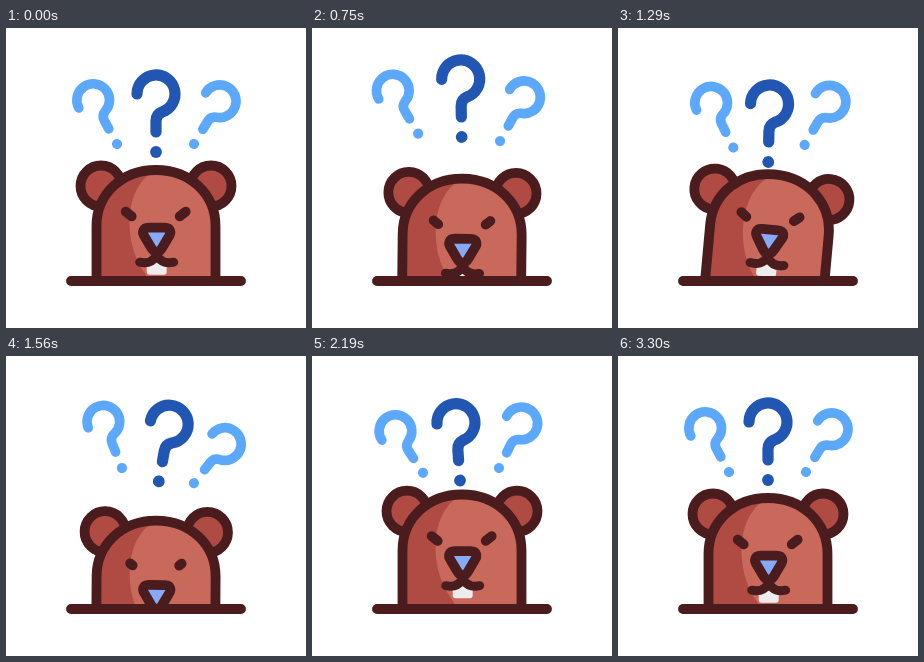
An HTML page for the animation above (4.53 s loop, 300 px wide and 300 px high).

```html
<!DOCTYPE html>
<html lang="en">
<head>
<meta charset="utf-8">
<title>Puzzled beaver</title>
<style>
  html, body { margin: 0; width: 100%; height: 100%; overflow: hidden; background: #fff; }
  svg { display: block; width: 100vw; height: 100vh; }
  .line { fill: none; stroke: #4b1c1e; stroke-width: 9.8; stroke-linecap: round; stroke-linejoin: round; }
  .light { fill: #c8695c; }
  .dark { fill: #b04b43; }
  .mark { color: #5ba8fd; }
  #mid { color: #2157b3; }
  #shape path { fill: none; stroke: currentColor; stroke-width: 11.2; stroke-linecap: round; }
  #shape circle { fill: currentColor; }
</style>
</head>
<body>
<svg viewBox="0 0 300 300">
  <defs>
    <clipPath id="above"><rect width="300" height="249"/></clipPath>
    <g id="shape">
      <path d="M-19-58A19 19 0 1 1 6-40Q0-37.500 0-31V-20"/>
      <circle r="5.900"/>
    </g>
  </defs>

  <g id="left" class="mark"><use href="#shape" transform="scale(.86)"/></g>
  <g id="mid" class="mark"><use href="#shape"/></g>
  <g id="right" class="mark"><use href="#shape" transform="scale(.86)"/></g>

  <g clip-path="url(#above)">
    <g id="ears">
      <circle id="earL" class="line" style="fill:#b04b43" r="20.500"/>
      <circle id="earR" class="line" style="fill:#b04b43" r="20.500"/>
    </g>
    <g id="head">
      <path class="light" d="M-59.500 40V-50C-59.500-82-34-106 0-106S59.500-82 59.500-50V40Z"/>
      <path class="dark" d="M-59.500 40V-50C-59.500-82-34-106 0-106C-18-97-26.500-76-26.500-53C-26.500-32-20-14-8 2V40Z"/>
      <path class="line" d="M-59.500 40V-50C-59.500-82-34-106 0-106S59.500-82 59.500-50V40"/>
    </g>
    <g id="eyes">
      <path id="eyeL" class="line"/>
      <path id="eyeR" class="line"/>
    </g>
    <g id="muzzle">
      <path fill="#ededed" d="M-10 20H10V34Q10 37 7 37H-7Q-10 37-10 34Z"/>
      <path class="line" style="stroke-width:9" d="M-17 24.500Q-6 27 0 18Q6 27 17 24.500"/>
      <path class="line" style="fill:#86a9f8" d="M-8-10H8C14-10 15-5 12-1L5.500 10Q0 19-5.500 10L-12-1C-15-5-14-10-8-10Z"/>
    </g>
  </g>
  <path class="line" d="M65 253H235"/>
</svg>

<script>
const LOOP = 4530, BEAT = 545;
const $ = id => document.getElementById(id);

// Each list holds the turning points of one swing, which starts and ends at rest.
const drop = [15, -5, 24, -3.5, 4];
const lean = [-2.7, 7.5, 0, 0, 0];

// rest: x, y, turn of the dot; first: time of the first turning point of the hop
const marks = {
  left: {
    rest: [111, 116, -28.5], first: 620,
    drift: [-9, 4, 5, 0, 2], hop: [-13, 5, -6, 1, 0], sway: [-3, 0, 7, -5, 0]
  },
  mid: {
    rest: [150, 124, 0], first: 750,
    drift: [0, -1, 3, -2, 1], hop: [-15, 10, -8, 4, 0], sway: [0, -3, 11, -4, 3]
  },
  right: {
    rest: [188, 116, 31], first: BEAT,
    drift: [1, -2, 0, -1, -2], hop: [-2.5, -4, 12, -4, 5], sway: [-1, -5, 8, -4.5, 0.5]
  }
};

// eased swing from one turning point to the next, one per beat
function swing(points, t, first = BEAT) {
  const s = t < first ? t / first : 1 + (t - first) / BEAT;
  const i = Math.floor(s), u = s - i;
  const from = points[i - 1] || 0, to = points[i] || 0;
  return from + (to - from) * u * u * (3 - 2 * u);
}

function place(id, x, y, turn = 0) {
  $(id).setAttribute('transform', `translate(${x} ${y}) rotate(${turn})`);
}

function eye(id, x, side, size) {
  const dx = 3 * size * side, dy = 2.4 * size;
  $(id).setAttribute('d', `M${x - dx} ${dy}L${x + dx} ${-dy}`);
}

function draw(t) {
  for (const id in marks) {
    const { rest: [x, y, turn], first, drift, hop, sway } = marks[id];
    place(id, x + swing(drift, t), y + swing(hop, t, first), turn + swing(sway, t));
  }

  // ears lag behind the nod, the nose runs ahead of it
  const d = swing(drop, t), a = swing(lean, t), tip = a * a;
  const low = Math.max(d, 0), spread = 55 - 0.17 * low + 0.11 * tip;
  place('head', 150 - 0.6 * a, 248 + d, a);
  place('ears', 150 + 0.75 * a, 158 + 0.8 * d + 0.19 * tip, a);
  place('earL', -spread, 0);
  place('earR', spread, 0);

  const gap = 27 - 0.11 * low, size = 1 - 0.026 * low;
  place('eyes', 149.7 + 0.5 * a, 186 + d - 0.04 * tip, a);
  eye('eyeL', -gap, -1, size);
  eye('eyeR', gap, 1, size);
  place('muzzle', 150.7 + 0.1 * a, 209.7 + 1.3 * d - 0.12 * tip, a);
}

const start = performance.now();
function tick() {
  draw((performance.now() - start) % LOOP);
  requestAnimationFrame(tick);
}
tick();
</script>
</body>
</html>
```
